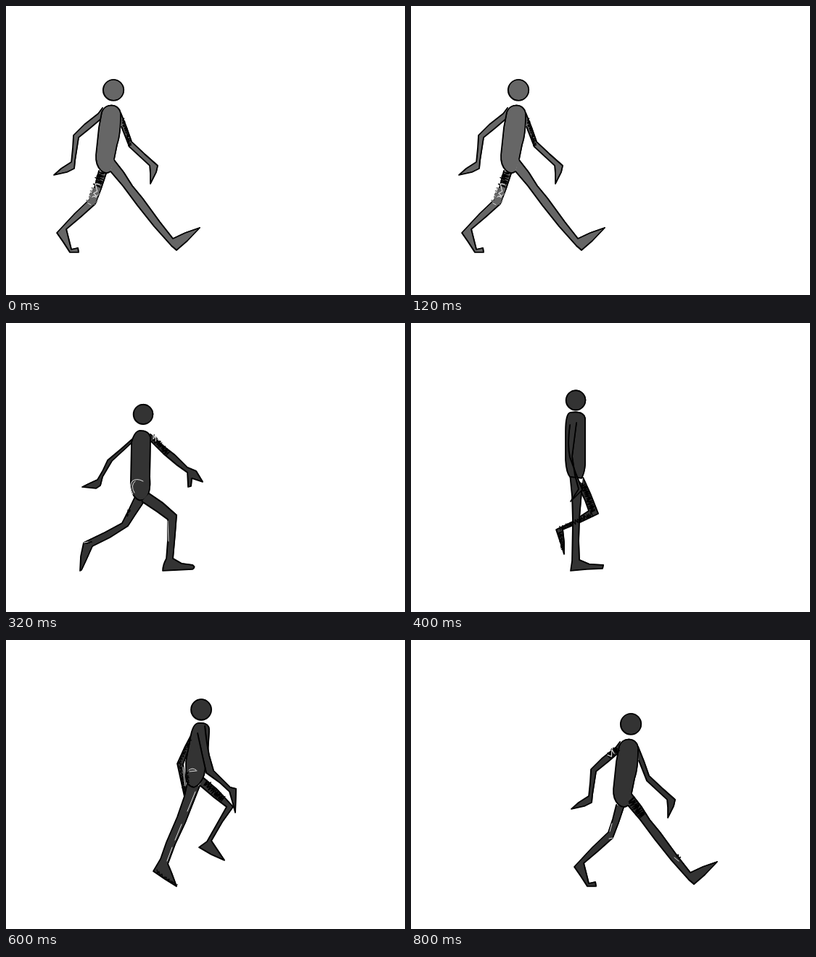
An HTML page with a canvas for the animation above (0.85 s loop, 550 by 400 pixels).

```html
<!DOCTYPE html>
<html lang="en">
<head>
<meta charset="utf-8">
<title>Walk cycle</title>
<style>
  html, body { margin: 0; width: 100%; height: 100%; overflow: hidden; background: #fff; }
  canvas { display: block; }
</style>
</head>
<body>
<canvas id="stage" width="550" height="400"></canvas>
<script>
const ctx = document.getElementById('stage').getContext('2d');
ctx.lineJoin = ctx.lineCap = 'round';

// Limbs are open paths: the fill closes them, the ink leaves the joint open.
const stride = {
  head: [148, 116.5, 14.2],
  parts: [
    'M133 141L127 149L108 164L93 179L92 196L90 216L76 225L66 234L84 230L94 225L95 214L100 182L116 169L130 157',
    'M158 148L166 168L173 188L191 205L209 221L207 230L199 246L199 232L198 221L184 208L170 195L159 167',
    'M128 228L123 248L117 266L95 287L70 314L79 327L88 341L100 341L99 335L90 337L83 309L103 292L123 274L131 253L138 232',
    'M148 212L162 230L174 249L188 266L212 299L230 322L247 314L267 307L250 325L235 338L228 332L204 305L181 276L161 249L144 229',
    'M144 229Q138 234 131 228Q123 220 124 206L128 168L132 147Q135 138 145 137.5Q156 138 158 149Q158 178 153 192L149 212'
  ]
};

const poses = [
  { ...stride, until: 200, fill: '#666',
    marks: [
      ['#000', 161, 156, 171, 193, 5, 34],
      ['#000', 132, 229, 126, 250, 13, 19],
      ['#666', 125, 252, 117, 273, 15, 32],
      ['#ddd', 127, 243, 122, 265, 7, 6]
    ],
    chalk: 'M121 263L124 265L127 261M113 273L117 275' },
  { until: 400, fill: '#333', head: [189, 126.5, 13.4],
    parts: [
      'M177 158L159 174L140 190L133 205L126 217L115 222L105 227L124 229L130 225L133 213L146 191L159 179L173 166',
      'M199 154L215 169L233 183L250 200L262 205L271 220L256 215L255 226L251 227L250 207L236 197L217 181L199 163',
      'M178 240L169 259L160 277L136 290L107 304L103 323L102 343L104 342L111 327L119 309L143 297L168 281L177 267L189 249',
      'M173 165Q177 150 184 149Q197 149 199 158L198 213Q200 236 192 243Q184 250 176 239Q171 230 172 215Z',
      'M197 236L216 249L235 266L233 292L230 326L242 333L257 335Q262 338 257 341L237 342L216 343Q216 335 221 326L223 300L223 272L208 261L187 247'
    ],
    marks: [
      ['#000', 202, 157, 223, 181, 9, 32],
      ['#000', 171, 256, 166, 268, 4, 9],
      ['#ccc', 201, 155, 208, 162, 5, 4],
      ['#000', 107, 306, 118, 303, 2, 6]
    ],
    chalk: 'M175 237Q169 225 174 219Q180 214 189 219M177 235Q171 225 178 219M223 274L224 302M107 304L113 303' },
  { until: 600, fill: '#333', head: [227, 107, 13.4],
    parts: [
      'M237 214L247 236L258 264L233 276L209 286L211 304L211 320L206 304L200 286L221 276L245 260L240 246L234 233',
      'M219 209L222 240L223 275L222 329L220 343L242 341L264 340L265 335L246 334L232 328L231 302L232 270L236 222',
      'M213 150Q213 126 219 124Q238 121 240 132L240 196Q239 208 235 215L219 213Q214 207 213 190Z',
      'M219 141Q215 169 219 186L227 208L236 231L220 247L231 230L226 211L222 185L228 138'
    ],
    marks: [
      ['#000', 238, 223, 251, 262, 9, 42],
      ['#000', 251, 264, 205, 285, 7, 37],
      ['#000', 205, 287, 210, 313, 6, 22]
    ] },
  { until: 800, fill: '#333', head: [269, 96.5, 14],
    parts: [
      'M257 128L246 149L236 171L241 194L246 217L247 200L244 172L252 150',
      'M271 190L291 207L313 231L298 252L283 278L291 290L301 305L283 297L266 287L277 279L290 256L304 231L287 218L267 201',
      'M250 197L246 216L236 245L221 280L213 303L203 320L219 331L235 341L228 322L223 310L233 283L247 253L256 230L267 202',
      'M254 136Q257 116 265 115Q281 114 280 126L278 158L273 187Q268 201 259 204Q248 202 248 190L248 168Z',
      'M274 119Q276 141 280 160L286 181L309 204L317 206L316 239L312 224L308 210L294 197L276 184L270 157L264 129'
    ],
    marks: [
      ['#000', 254, 138, 238, 171, 5, 22],
      ['#000', 240, 171, 245, 207, 4, 23],
      ['#000', 274, 196, 299, 221, 11, 34],
      ['#000', 249, 181, 252, 201, 4, 14],
      ['#000', 205, 318, 235, 340, 4, 15]
    ],
    chalk: 'M252 180Q257 176 262 180M253 182L263 181M261 210L250 237M242 255L233 277M229 287L222 306M244 176L247 202' },
  { ...stride, until: 850, fill: '#333', shift: 155,
    marks: [
      ['#000', 130, 150, 117, 161, 11, 20],
      ['#000', 147, 219, 164, 244, 13, 30],
      ['#ddd', 128, 151, 118, 161, 8, 4],
      ['#000', 210, 297, 216, 302, 5, 6]
    ],
    chalk: 'M119 265L122 254M118 275L123 274M208 301L214 306' }
];

let seed;
const random = () => (seed = (seed * 16807) % 2147483647) / 2147483647;

function ink(path, color, width) {
  ctx.strokeStyle = color;
  ctx.lineWidth = width;
  ctx.stroke(path);
}

// Uneven zigzag from (x1, y1) to (x2, y2)
function scribble([color, x1, y1, x2, y2, width, count]) {
  const length = Math.hypot(x2 - x1, y2 - y1);
  const nx = (y1 - y2) / length, ny = (x2 - x1) / length;
  const path = new Path2D();
  for (let i = 0; i < count; i++) {
    const t = Math.min(1, (i + random() * 2) / count);
    const side = (i % 2 ? 0.5 : -0.5) * width * (0.5 + 0.5 * random());
    path.lineTo(x1 + (x2 - x1) * t + nx * side, y1 + (y2 - y1) * t + ny * side);
  }
  ink(path, color, 1.2);
}

function outline(path, fill) {
  ctx.fillStyle = fill;
  ctx.fill(path);
  ink(path, '#000', 1.7);
  ctx.save();
  ctx.translate(0.5, -0.5);
  ink(path, '#000', 0.9);
  ctx.restore();
}

function draw({ head: [x, y, r], parts, marks, chalk, fill, shift = 0 }) {
  seed = 11;
  ctx.clearRect(0, 0, 550, 400);
  ctx.save();
  ctx.translate(shift, 0);
  const skull = new Path2D();
  skull.ellipse(x, y, r, r + 0.3, 0, 0, 7);
  outline(skull, fill);
  parts.forEach(d => outline(new Path2D(d), fill));
  marks.forEach(scribble);
  if (chalk) ink(new Path2D(chalk), '#ddd', 1);
  ctx.restore();
}

function tick() {
  const time = performance.now() % 850;
  draw(poses.find(pose => time < pose.until));
  requestAnimationFrame(tick);
}
tick();
</script>
</body>
</html>
```
